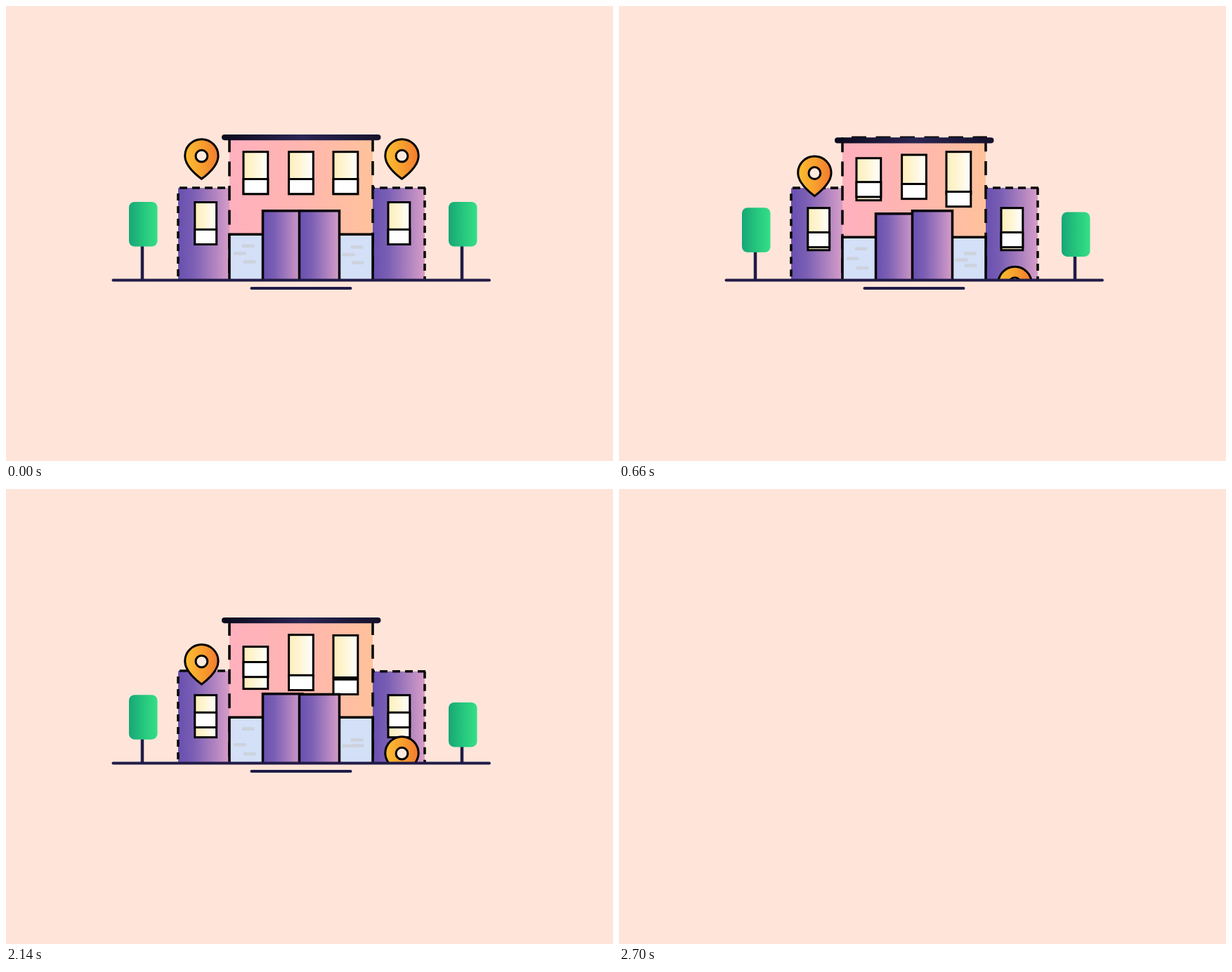
An HTML page that plays this animation: 864x648 px, repeating every 4600 ms.

```html
<!DOCTYPE html>
<html lang="en">
<head>
<meta charset="utf-8">
<title>Pop-up building</title>
<style>
html, body { margin: 0; width: 100%; height: 100%; overflow: hidden; background: #ffe5d9; }
svg { display: block; width: 100vw; height: 100vh; }
</style>
</head>
<body>
<svg id="stage" viewBox="0 0 864 648">
  <defs>
    <linearGradient id="wall"><stop stop-color="#ffb0be"/><stop offset=".5" stop-color="#ffb6af"/><stop offset="1" stop-color="#ffc29b"/></linearGradient>
    <linearGradient id="violet"><stop stop-color="#6850b0"/><stop offset=".3" stop-color="#7b5fb4"/><stop offset="1" stop-color="#d69dc8"/></linearGradient>
    <linearGradient id="glass"><stop stop-color="#fdeebb"/><stop offset=".45" stop-color="#fff5d3"/><stop offset="1" stop-color="#fff"/></linearGradient>
    <linearGradient id="leaf"><stop stop-color="#17a677"/><stop offset=".5" stop-color="#25c67d"/><stop offset="1" stop-color="#36df86"/></linearGradient>
    <linearGradient id="amber"><stop stop-color="#fcbd31"/><stop offset=".5" stop-color="#f8a02e"/><stop offset="1" stop-color="#f2792f"/></linearGradient>
    <linearGradient id="navy"><stop stop-color="#0b0a1c"/><stop offset=".5" stop-color="#2a2553"/><stop offset="1" stop-color="#15122c"/></linearGradient>
    <clipPath id="above"><rect width="864" height="390"/></clipPath>
    <clipPath id="leafClip"><rect width="864" height="392.5"/></clipPath>
  </defs>
  <g id="scene">
    <g id="building" clip-path="url(#above)"></g>
    <g stroke="#211b47" stroke-width="4" stroke-linecap="round">
      <path d="M152.5 390.5H688M349.5 402H490.5"/>
    </g>
    <g id="leaves" clip-path="url(#leafClip)"></g>
  </g>
</svg>
<script>
const NS = 'http://www.w3.org/2000/svg';
const LOOP = 4600, REST = 1400, SPAN = 480, GROUND = 390;
const byId = id => document.getElementById(id);
const scene = byId('scene');
const parts = [];

// Arrival end and departure start of each wave, in ms
const WAVES = {
  first: [511, 2070], wing: [693, 2224],
  roof: [822, 2130], second: [822, 2176],
  third: [880, 1868], midPane: [862, 1850],
  lastBrick: [900, 1850], rightLeaf: [934, 1812],
  rightPane: [946, 1825], leftPin: [958, 1820], rightPin: [1130, 1680]
};

function make(parent, tag, attrs) {
  const node = document.createElementNS(NS, tag);
  for (const key in attrs) node.setAttribute(key, attrs[key]);
  return parent.appendChild(node);
}

function part(wave, top, parent = byId('building')) {
  const node = make(parent, 'g', {});
  const [end, start] = WAVES[wave];
  parts.push({ node, end, start, depth: GROUND - top });
  return node;
}

function box(parent, x, y, width, height, fill, line = 0) {
  return make(parent, 'rect', { x, y, width, height, fill, stroke: line ? '#000' : 'none', 'stroke-width': line });
}

function dashed(parent, d, dash, gap, shift = 0) {
  make(parent, 'path', {
    d, fill: 'none', stroke: '#0a0a0a', 'stroke-width': 3.6,
    'stroke-dasharray': dash + ' ' + gap, 'stroke-dashoffset': shift
  });
}

function trunk(x, wave) {
  make(part(wave, 333), 'path', {
    d: `M${x} 335.5V400`, stroke: '#211b47', 'stroke-width': 4.5, 'stroke-linecap': 'round'
  });
}

function pane(x, y, width, glassWave, paneWave) {
  box(part(glassWave, y), x, y, width, 60, 'url(#glass)', 3);
  box(part(paneWave, y + 39), x, y + 38.8, width, 21.2, '#fff', 3);
}

function brick(x, y, wave) {
  box(part(wave, y - 10), x, y, 17.5, 4.6, '#cdd2dd');
}

function pin(x, wave) {
  const g = part(wave, 188);
  const r = 23.7;
  make(g, 'path', {
    d: `M${x} 246.3C${x - 7} 241 ${x - r} 227 ${x - r} 213.4A${r} ${r} 0 0 1 ${x + r} 213.4C${x + r} 227 ${x + 7} 241 ${x} 246.3Z`,
    fill: 'url(#amber)', stroke: '#000', 'stroke-width': 3, 'stroke-linejoin': 'round'
  });
  make(g, 'circle', { cx: x, cy: 213.7, r: 8.4, fill: '#ffe9df', stroke: '#000', 'stroke-width': 3 });
}

function leaf(x, wave) {
  make(part(wave, 279, byId('leaves')), 'rect', {
    x, y: 279, width: 40.5, height: 63.5, rx: 8, fill: 'url(#leaf)'
  });
}

function build() {
  trunk(194, 'first');
  trunk(649, 'second');

  const left = part('wing', 259);
  box(left, 245, 259, 73, 140, 'url(#violet)');
  dashed(left, 'M245 259V399', 10, 8, 10);
  dashed(left, 'M245 259H318', 11, 7, 16);

  const right = part('first', 259);
  box(right, 522, 259, 74, 140, 'url(#violet)');
  dashed(right, 'M596 259V399', 10, 8);
  dashed(right, 'M522 259H597.5', 11, 7, 8);

  pane(268.8, 279.5, 30.8, 'third', 'second');
  pane(544, 279.5, 30.8, 'third', 'second');

  const main = part('first', 187);
  box(main, 318, 187, 204, 210, 'url(#wall)');
  dashed(main, 'M318 187.2V400', 21, 13.4);
  dashed(main, 'M522 187.2V400', 20, 13.9);
  dashed(main, 'M318 187.2H523.8', 21, 13.5, 21.5);

  box(part('second', 325), 318, 325.2, 204, 80, '#d3e0f7', 3.5);
  brick(336, 339.3, 'second');
  brick(324, 350, 'third');
  brick(337.8, 362, 'lastBrick');
  brick(490.8, 341, 'lastBrick');
  brick(478.8, 351.7, 'third');
  brick(492, 363.3, 'second');

  pane(338, 207.7, 34.8, 'third', 'second');
  pane(402.6, 207.7, 34.8, 'roof', 'midPane');
  pane(466, 207.7, 34.8, 'first', 'rightPane');

  box(part('second', 291), 365.5, 291.7, 56.5, 110, 'url(#violet)', 3.5);
  box(part('first', 291), 417.5, 291.7, 57, 110, 'url(#violet)', 3.5);

  make(part('roof', 183), 'rect', {
    x: 307, y: 183, width: 226.5, height: 8.2, rx: 4.1, fill: 'url(#navy)'
  });

  pin(278.4, 'leftPin');
  pin(563.5, 'rightPin');
  leaf(175, 'third');
  leaf(630, 'rightLeaf');
}

// Some poses are held before the motion resumes; null is the empty stage
function poseTime(t) {
  if (t < 20) return REST;
  if (t < 100) return null;
  if (t < 240) return 100;
  if (t < 1060) return t;
  if (t < 1920) return REST;
  if (t < 2700) return Math.min(t, 2580);
  return null;
}

// Quick travel through the ground, with a short soft settle near the top
function drop(u, depth) {
  const soft = 35;
  return soft * u * u + (depth - soft) * u ** 5.74;
}

function render(ms) {
  const t = poseTime(Math.floor((ms % LOOP) / 20) * 20);
  scene.style.display = t === null ? 'none' : '';
  if (t === null) return;
  for (const p of parts) {
    const raw = t <= REST ? p.end - t : t - p.start;
    const u = Math.min(1, Math.max(0, raw / SPAN));
    p.node.style.display = u < 1 ? '' : 'none';
    p.node.setAttribute('transform', `translate(0 ${drop(u, p.depth).toFixed(2)})`);
  }
}

build();
const begin = performance.now();
function tick() {
  render(performance.now() - begin);
  requestAnimationFrame(tick);
}
tick();
</script>
</body>
</html>
```
